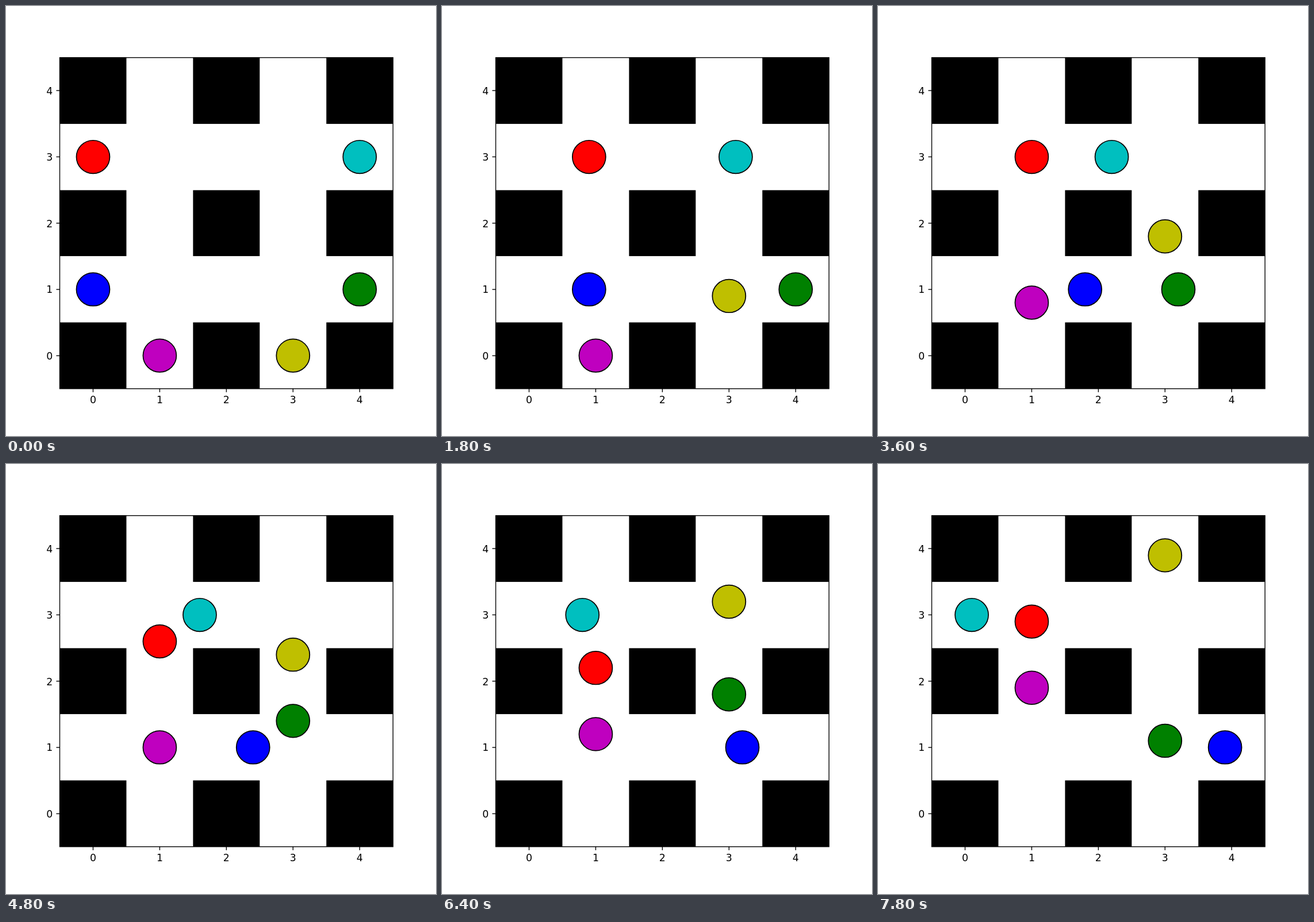
Recreate the animation shown at these times as an HTML page with a canvas. Size 748 by 748 pixels, loop 8 s.

```html
<!DOCTYPE html>
<html lang="en">
<head>
<meta charset="utf-8">
<title>Grid agents</title>
<style>
  html, body { margin: 0; width: 100%; height: 100%; overflow: hidden; background: #fff; }
  canvas { display: block; width: 748px; height: 748px; }
</style>
</head>
<body>
<canvas id="stage"></canvas>
<script>
// The figure is laid out as 6 x 6 inches at 200 dpi, then scaled to the stage.
const STAGE = 748, SIZE = 1200, PT = 200 / 72, CELLS = 5;
const LOOP = 8000, TICK = 200, TICKS_PER_MOVE = 10;
const left = SIZE * 0.125, right = SIZE * 0.9;
const upper = SIZE * 0.12, lower = SIZE * 0.89;
const cellW = (right - left) / CELLS, cellH = (lower - upper) / CELLS;

const STEPS = { R: [1, 0], L: [-1, 0], U: [0, 1], D: [0, -1], '-': [0, 0] };

// Each agent makes one step or pause per move.
const agents = [
  { color: '#ff0000', start: [0, 3], moves: 'R-DU' },
  { color: '#0000ff', start: [0, 1], moves: 'RRRR' },
  { color: '#008000', start: [4, 1], moves: '-LUD' },
  { color: '#00bfbf', start: [4, 3], moves: 'LLLL' },
  { color: '#bf00bf', start: [1, 0], moves: '-U-U' },
  { color: '#bfbf00', start: [3, 0], moves: 'UUUU' }
];

const canvas = document.getElementById('stage');
const ctx = canvas.getContext('2d');
canvas.width = canvas.height = Math.round(STAGE * (window.devicePixelRatio || 1));
ctx.scale(canvas.width / SIZE, canvas.height / SIZE);

const px = col => left + (col + 0.5) * cellW;
const py = row => lower - (row + 0.5) * cellH;
const clamp = v => Math.min(1, Math.max(0, v));

function line(x1, y1, x2, y2) {
  ctx.beginPath();
  ctx.moveTo(x1, y1);
  ctx.lineTo(x2, y2);
  ctx.stroke();
}

function drawWalls() {
  ctx.fillStyle = '#000';
  for (let row = 0; row < CELLS; row += 2) {
    for (let col = 0; col < CELLS; col += 2) {
      const y = Math.round(py(row + 0.5));
      ctx.fillRect(px(col - 0.5), y, cellW, Math.round(py(row - 0.5)) - y);
    }
  }
}

function drawAxes() {
  const tick = 3.5 * PT, gap = 2 * tick, ascent = 7.6 * PT;
  ctx.strokeStyle = ctx.fillStyle = '#000';
  ctx.lineWidth = 0.8 * PT;
  ctx.strokeRect(left, upper, right - left, lower - upper);
  ctx.font = `${10 * PT}px "DejaVu Sans", sans-serif`;
  for (let i = 0; i < CELLS; i++) {
    const x = px(i), y = Math.round(py(i));
    line(x, lower, x, lower + tick);
    line(left, y, left - tick, y);
    ctx.textAlign = 'center';
    ctx.fillText(i, x, Math.round(lower + gap + ascent));
    ctx.textAlign = 'right';
    ctx.fillText(i, left - gap, Math.round(py(i) + ascent / 2));
  }
}

function place({ start, moves }, progress) {
  return start.map((from, axis) => [...moves].reduce(
    (pos, move, i) => pos + STEPS[move][axis] * clamp(progress - i), from));
}

function drawAgent(agent, progress) {
  const [col, row] = place(agent, progress);
  ctx.beginPath();
  ctx.ellipse(px(col), py(row), cellW / 4, cellH / 4, 0, 0, Math.PI * 2);
  ctx.fillStyle = agent.color;
  ctx.fill();
  ctx.strokeStyle = '#000';
  ctx.lineWidth = PT;
  ctx.stroke();
}

function draw(time) {
  const progress = Math.floor((time % LOOP) / TICK) / TICKS_PER_MOVE;
  ctx.fillStyle = '#fff';
  ctx.fillRect(0, 0, SIZE, SIZE);
  drawWalls();
  for (const agent of agents) drawAgent(agent, progress);
  drawAxes();
}

const began = performance.now();
function loop() {
  draw(performance.now() - began);
  requestAnimationFrame(loop);
}
loop();
</script>
</body>
</html>
```
